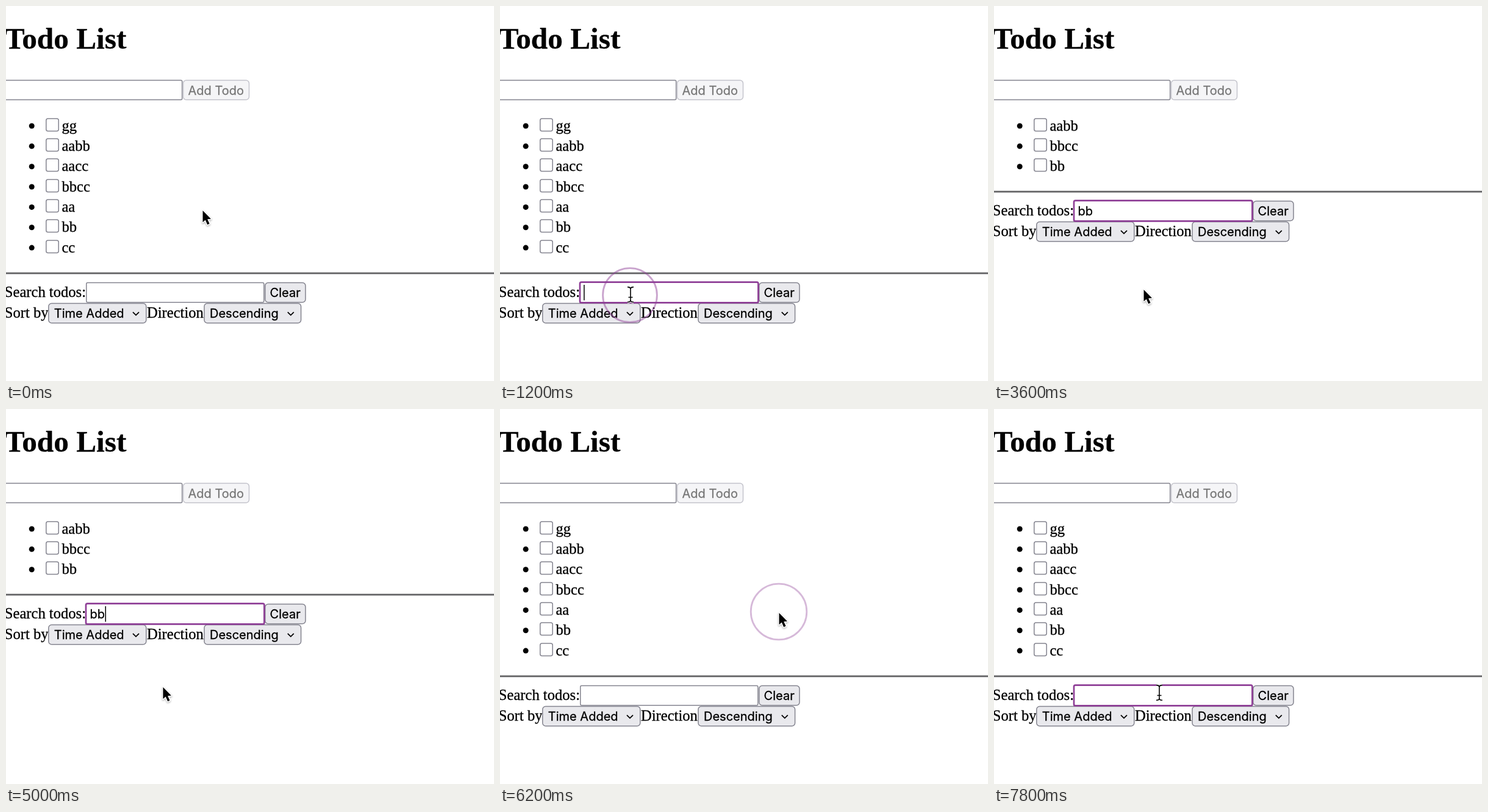
Write an HTML page with a canvas that moves like this. It is 800x616 px and loops after 8000 ms.

```html
<!DOCTYPE html>
<html lang="en">
<head>
<meta charset="utf-8">
<title>Todo List</title>
<style>
  html, body { margin: 0; width: 100%; height: 100%; overflow: hidden; background: #fff; }
  canvas { display: block; width: 800px; height: 616px; }
</style>
</head>
<body>
<canvas id="stage" width="800" height="616"></canvas>
<script>
const ctx = document.getElementById('stage').getContext('2d');

const LOOP = 8000, STEP = 100;
const ROW = 33.35;
const SERIF = '24.6px "Liberation Serif", serif';
const TITLE = 'bold 49.3px "Liberation Serif", serif';
const SANS = '20px Inter, sans-serif';
const BORDER = '#84848f', BUTTON = '#e9e9ed', ACCENT = '#8f3f97';

const TODOS = ['gg', 'aabb', 'aacc', 'bbcc', 'aa', 'bb', 'cc'];

// Time, x, y of the pointer
const PATH = [
  [0, 322, 336], [900, 214, 474], [3300, 214, 474], [3600, 245, 466],
  [4900, 245, 466], [5500, 406, 345], [5800, 457, 335], [6200, 457, 335],
  [6700, 245, 437], [6800, 245, 437], [7200, 271, 466], [8000, 271, 466]
];
const CLICKS = [[1100, 213, 475], [6000, 457, 333], [7300, 271, 467]];
const CARET = [[1100, 1600], [2100, 2600], [2900, 3500], [4000, 4500], [5000, 5600], [7300, 7800]];
const FOCUS = [[1100, 6000], [7300, 8000]];
const HIDDEN = [[2800, 3400]];

const during = (spans, t) => spans.some(([a, b]) => t >= a && t < b);
const ease = p => p * p * (3 - 2 * p);

function text(str, x, y, font = SERIF, color = '#000') {
  ctx.font = font;
  ctx.fillStyle = ctx.strokeStyle = color;
  ctx.fillText(str, x, y);
  // A hairline outline gives the slightly heavier desktop rendering
  ctx.lineWidth = 0.3;
  ctx.strokeText(str, x, y);
}

function box(x, y, w, h, r, fill, stroke, line = 1.5) {
  ctx.beginPath();
  ctx.roundRect(x, y, w, h, r);
  ctx.fillStyle = fill;
  ctx.fill();
  ctx.strokeStyle = stroke;
  ctx.lineWidth = line;
  ctx.stroke();
}

function select(label, x, y, w) {
  box(x, y, w, 32.2, 5, BUTTON, BORDER);
  text(label, x + 9, y + 23.2, SANS);
  const cx = x + w - 16.8, cy = y + 16.6;
  ctx.beginPath();
  ctx.moveTo(cx - 5, cy - 2.4);
  ctx.lineTo(cx, cy + 2.6);
  ctx.lineTo(cx + 5, cy - 2.4);
  ctx.strokeStyle = '#000';
  ctx.lineWidth = 1.8;
  ctx.stroke();
}

function drawTop() {
  text('Todo List', -2.2, 70, TITLE);
  box(-10, 122, 298.7, 32, 2, '#fff', BORDER);
  box(290.5, 122, 108, 32, 5, '#f5f5f7', '#c4c4cc');
  text('Add Todo', 298.5, 145.8, SANS, '#777');
}

function drawTodo(label, i) {
  const y = i * ROW;
  ctx.beginPath();
  ctx.arc(42.2, 197 + y, 4.5, 0, Math.PI * 2);
  ctx.fillStyle = '#000';
  ctx.fill();
  box(65.8, Math.floor(185 + y) + 0.1, 20.4, 20.4, 3, '#fff', BORDER);
  text(label, 91.4, 204.6 + y);
}

function drawSearch(t, query) {
  ctx.fillStyle = '#626264';
  ctx.fillRect(0, 437.6, 800, 2.8);
  text('Search todos:', -2.2, 478.4);
  text('Sort by', -2.2, 512.4);
  text('Direction', 231, 512.4);
  box(424.8, 454.5, 66.2, 32.2, 5, BUTTON, BORDER);
  text('Clear', 432.6, 478, SANS);
  select('Time Added', 69.8, 488.6, 160);
  select('Descending', 325, 488.6, 158.6);

  if (during(FOCUS, t)) box(131, 453.6, 292.4, 33.8, 2.5, '#fff', ACCENT, 2.7);
  else box(131.8, 454.5, 291, 32.2, 2, '#fff', BORDER);
  text(query, 137.4, 478, SANS);
  if (during(CARET, t)) {
    const x = 137.2 + (query ? ctx.measureText(query).width + 0.8 : 0);
    ctx.fillStyle = '#000';
    ctx.fillRect(x, 458, 1.5, 25.5);
  }
}

function pointerAt(t) {
  const i = PATH.findIndex(p => p[0] > t);
  const [t0, x0, y0] = PATH[i - 1], [t1, x1, y1] = PATH[i];
  const p = ease((t - t0) / (t1 - t0));
  return [x0 + (x1 - x0) * p, y0 + (y1 - y0) * p];
}

function drawArrow(x, y) {
  const shape = [[0.5, 0], [0.5, 19.2], [4.8, 15.4], [8.2, 23.2], [11.6, 21.6], [8.2, 14.2], [14, 13.8]];
  ctx.beginPath();
  shape.forEach(([dx, dy]) => ctx.lineTo(x + dx, y + dy));
  ctx.closePath();
  ctx.lineJoin = 'round';
  ctx.save();
  ctx.shadowColor = 'rgba(0,0,0,.3)';
  ctx.shadowBlur = 3;
  ctx.shadowOffsetY = 1.5;
  ctx.strokeStyle = '#fff';
  ctx.lineWidth = 3;
  ctx.stroke();
  ctx.restore();
  ctx.fillStyle = '#000';
  ctx.fill();
  ctx.lineJoin = 'miter';
}

function drawBeam(x, y) {
  ctx.beginPath();
  for (const s of [-1, 1]) {
    ctx.moveTo(x - 5, y + s * 12.4);
    ctx.quadraticCurveTo(x, y + s * 12.4, x, y + s * 9);
    ctx.quadraticCurveTo(x, y + s * 12.4, x + 5, y + s * 12.4);
  }
  ctx.moveTo(x, y - 10);
  ctx.lineTo(x, y + 10);
  ctx.moveTo(x - 3.5, y + 4.5);
  ctx.lineTo(x + 3.5, y + 4.5);
  for (const [color, width] of [['#fff', 4], ['#000', 1.6]]) {
    ctx.strokeStyle = color;
    ctx.lineWidth = width;
    ctx.stroke();
  }
}

function drawRipples(t) {
  for (const [start, x, y] of CLICKS) {
    const p = (t - start) / 500;
    if (p < 0 || p >= 1) continue;
    ctx.beginPath();
    ctx.arc(x, y, 43 + 7 * p, 0, Math.PI * 2);
    ctx.globalAlpha = 0.6 * (1 - p);
    ctx.strokeStyle = ACCENT;
    ctx.lineWidth = 2.8;
    ctx.stroke();
    ctx.globalAlpha = 1;
  }
}

function draw(t) {
  const query = t < 2800 || t >= 6000 ? '' : t < 3000 ? 'b' : 'bb';
  const filtered = t >= 2900 && t < 6000;
  const todos = filtered ? TODOS.filter(s => s.includes(query)) : TODOS;
  const shift = Math.floor((todos.length - TODOS.length) * ROW);

  ctx.fillStyle = '#fff';
  ctx.fillRect(0, 0, 800, 616);
  drawTop();
  todos.forEach(drawTodo);
  ctx.save();
  ctx.translate(0, shift);
  drawSearch(t, query);
  ctx.restore();
  drawRipples(t);

  if (during(HIDDEN, t)) return;
  const [x, y] = pointerAt(t);
  const top = 454 + shift;
  const inField = x > 131 && x < 424 && y > top && y < top + 33;
  (inField ? drawBeam : drawArrow)(x, y);
}

const origin = performance.now();
function tick() {
  const t = (performance.now() - origin) % LOOP;
  draw(Math.floor(t / STEP) * STEP);
  requestAnimationFrame(tick);
}
tick();
</script>
</body>
</html>
```
